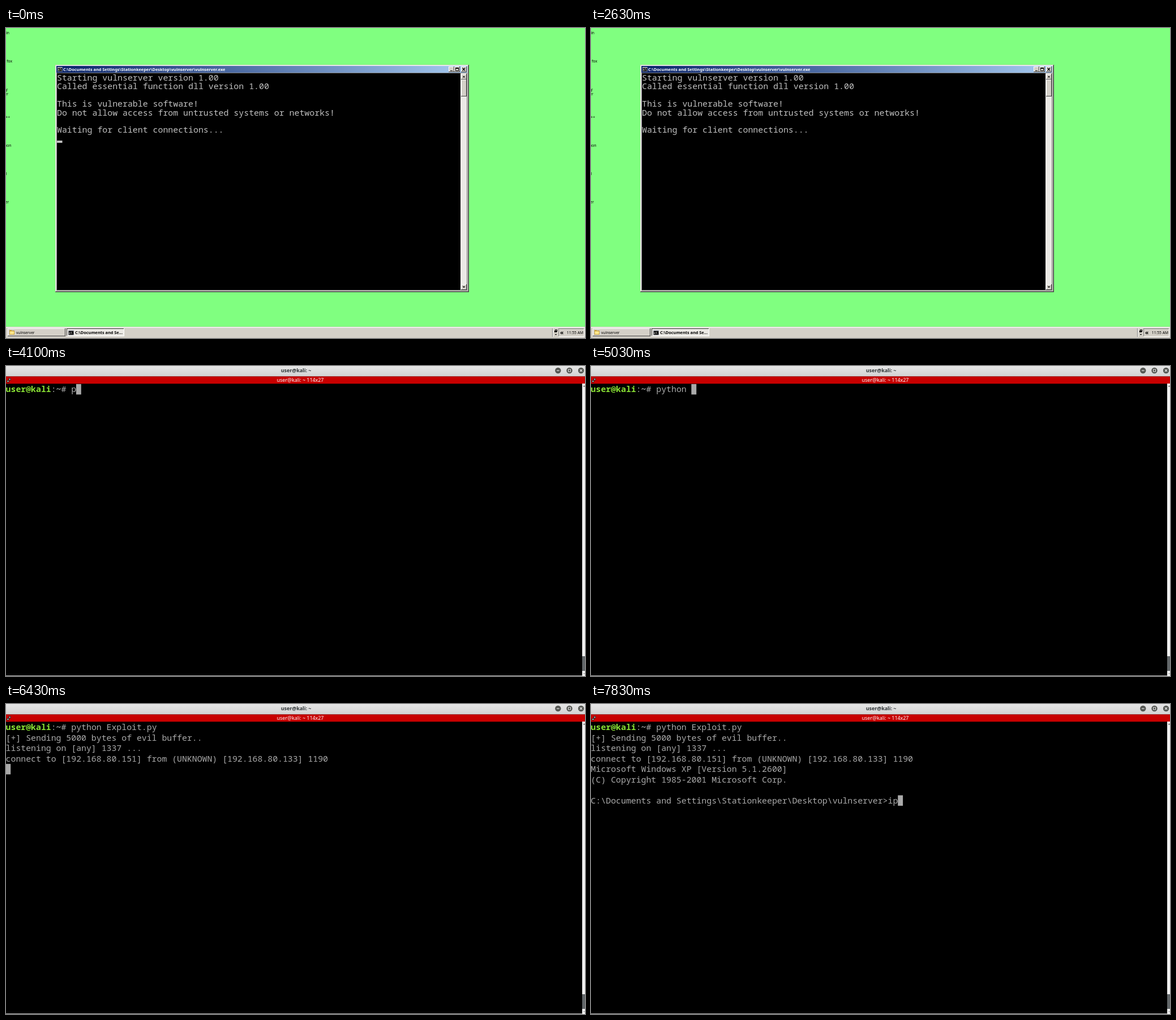
An HTML page with a canvas that plays this animation: 1023x548 px, repeating every 8000 ms.

```html
<!DOCTYPE html>
<html lang="en">
<head>
<meta charset="utf-8">
<title>Terminal session</title>
<style>
html, body { margin: 0; width: 100%; height: 100%; overflow: hidden; background: #000; }
canvas { display: block; width: 1023px; height: 548px; }
</style>
</head>
<body>
<canvas id="stage" width="1023" height="548"></canvas>
<script>
const ctx = document.getElementById('stage').getContext('2d');
const LOOP = 8000;
const SANS = '"Noto Sans", "Open Sans", sans-serif';
const MONO = '"Noto Sans Mono", "DejaVu Sans Mono", monospace';
const FACE = '#d4d0c8', DARK = '#404040', SHADE = '#808080', GREY = '#aaaaaa';
const PATH = 'C:\\Documents and Settings\\Stationkeeper\\Desktop\\vulnserver';
const HOST = 'user@kali';

function box(x, y, w, h, color) {
  ctx.fillStyle = color;
  ctx.fillRect(x, y, w, h);
}

function text(str, x, y, font, color, align = 'left') {
  ctx.font = font;
  ctx.fillStyle = color;
  ctx.textAlign = align;
  ctx.fillText(str, x, y);
}

function poly(points, color) {
  ctx.fillStyle = color;
  ctx.beginPath();
  points.forEach(([x, y]) => ctx.lineTo(x, y));
  ctx.fill();
}

function frame(x, y, w, h, color) {
  ctx.strokeStyle = color;
  ctx.lineWidth = 1;
  ctx.strokeRect(x + 0.5, y + 0.5, w - 1, h - 1);
}

function bevel(x, y, w, h, face, light, dark) {
  box(x, y, w, h, face);
  box(x, y, w, 1, light);
  box(x, y, 1, h, light);
  box(x, y + h - 1, w, 1, dark);
  box(x + w - 1, y, 1, h, dark);
}

const raised = (x, y, w, h) => bevel(x, y, w, h, FACE, '#fff', DARK);

function arrow(x, y, dir, size = 2.5, color = '#000') {
  poly([[x - size, y - dir * size / 2], [x + size, y - dir * size / 2], [x, y + dir * size / 2]], color);
}

function shellIcon(x, y, w, h) {
  box(x, y, w, h, '#c8ccd4');
  box(x + 0.6, y + 1.5, w - 1.2, h - 2.1, '#000');
  text('c:\\', x + 1.3, y + h - 2, `bold 4.5px ${SANS}`, '#fff');
}

/* Desktop with the server console */

const LABELS = [
  ['in', 6, 9], ['fox', 11, 59], ['y', 3, 109], ['er', 4, 117],
  ['++', 7, 158], ['hon', 9.5, 208], ['l', 1.5, 258], ['er', 5, 308]
];

const SERVER_LOG = [
  'Starting vulnserver version 1.00',
  'Called essential function dll version 1.00',
  '',
  'This is vulnerable software!',
  'Do not allow access from untrusted systems or networks!',
  '',
  'Waiting for client connections...'
];

const BLINKS = [520, 990, 1550, 2080, 2630];
const passed = (times, t) => times.filter(at => t >= at).length;

function titleButtons() {
  [782, 792, 804].forEach(x => raised(x, 68, 10, 10));
  box(785, 75, 4, 1, '#000');
  frame(794, 70, 6, 6, '#000');
  box(794, 70, 6, 2, '#000');
  ctx.strokeStyle = '#000';
  ctx.lineWidth = 1.2;
  ctx.beginPath();
  ctx.moveTo(806.5, 70.5);
  ctx.lineTo(811, 75.5);
  ctx.moveTo(811, 70.5);
  ctx.lineTo(806.5, 75.5);
  ctx.stroke();
}

function consoleWindow(t) {
  bevel(87, 65, 731, 402, FACE, FACE, DARK);
  bevel(88, 66, 729, 400, FACE, '#fff', SHADE);
  const grad = ctx.createLinearGradient(89, 0, 815, 0);
  grad.addColorStop(0, '#0a246a');
  grad.addColorStop(1, '#a6caf0');
  box(89, 67, 726, 12, grad);
  shellIcon(91, 69, 8.5, 8);
  text(PATH + '\\vulnserver.exe', 101, 75.7, `bold 7.35px ${SANS}`, '#fff');
  titleButtons();

  box(89, 79, 726, 385, SHADE);
  box(90, 80, 713, 383, '#000');
  box(803, 80, 11, 383, '#ebe9e5');
  raised(804, 81, 10, 10);
  raised(804, 91, 10, 30);
  raised(804, 453, 10, 10);
  arrow(809, 86, -1);
  arrow(809, 458, 1);

  SERVER_LOG.forEach((line, i) => text(line, 90, 93 + i * 15.4, `14.88px ${MONO}`, '#c0c0c0'));
  if (passed(BLINKS, t) % 2 === 0) box(90, 199, 9.5, 4, '#c0c0c0');
}

function taskbar() {
  box(0, 528, 1023, 20, FACE);
  box(0, 529, 1023, 1, '#fff');

  raised(3, 531, 102, 14);
  box(6, 534, 4, 2, '#d8b040');
  box(6, 535, 9, 7, '#b08820');
  box(6.7, 536, 7.6, 5.3, '#ffe88c');
  text('vulnserver', 18, 540.5, `6.6px ${SANS}`, '#000');

  bevel(107, 531, 102, 14, '#ebe9e4', DARK, '#fff');
  shellIcon(110, 534, 10, 9);
  text('C:\\Documents and Se...', 122, 541, `bold 7.35px ${SANS}`, '#000');

  box(965, 531, 1, 15, SHADE);
  box(966, 531, 1, 15, '#fff');
  frame(970, 533, 4, 4, '#000');
  frame(969, 535, 4, 3, '#000');
  arrow(971.5, 542, 1, 1.8);
  bevel(976, 531, 46, 15, FACE, SHADE, '#fff');
  text('«', 979, 541.5, `bold 10px ${SANS}`, '#000');
  text('11:55 AM', 1020, 541, `6.7px ${SANS}`, '#000', 'right');
}

function desktop(t) {
  box(0, 0, 1023, 548, '#80ff80');
  LABELS.forEach(([str, right, mid]) => text(str, right, mid + 2.4, `6.7px ${SANS}`, '#000', 'right'));
  consoleWindow(t);
  taskbar();
}

/* Full-screen terminal */

const CELL = 8.9, ROW = 18.5, LEFT = -0.4, TOP = 31.9;
const TERM = `14.83px ${MONO}`;
const COMMAND = 'python Exploit.py ';
const KEYS = [4100, 4250, 4420, 4570, 4730, 4880, 5030, 5200, 5430];
const COMPLETE = 5660;
const REPLY_KEYS = [7680, 7830];
const OUTPUT = [
  [5970, '[+] Sending 5000 bytes of evil buffer..'],
  [5970, 'listening on [any] 1337 ...'],
  [6430, 'connect to [192.168.80.151] from (UNKNOWN) [192.168.80.133] 1190'],
  [6510, 'Microsoft Windows XP [Version 5.1.2600]'],
  [6580, '(C) Copyright 1985-2001 Microsoft Corp.'],
  [6580, '']
];
const PROMPT_AT = 6580, CURSOR_OFF = 7130;

function put(str, col, row, color = GREY, weight = '') {
  text(str, LEFT + col * CELL, TOP + row * ROW + 14.4, `${weight} ${TERM}`, color);
}

function cursor(col, row) {
  box(LEFT + col * CELL - 0.3, TOP + row * ROW, CELL, ROW, GREY);
}

function windowButton(x) {
  ctx.fillStyle = '#555753';
  ctx.beginPath();
  ctx.arc(x, 8, 5.2, 0, 7);
  ctx.fill();
}

function chrome() {
  const grad = ctx.createLinearGradient(0, 0, 0, 18);
  grad.addColorStop(0, '#e6e6e6');
  grad.addColorStop(1, '#d3d3d3');
  box(0, 0, 1023, 18.5, grad);
  text(HOST + ': ~', 512.5, 11.2, `bold 8.9px ${SANS}`, '#2e3436', 'center');

  [975.3, 995.5, 1016].forEach(windowButton);
  box(973, 7.5, 4.6, 1.2, '#e4e4e4');
  frame(993, 5.5, 5, 5, '#e4e4e4');
  ctx.strokeStyle = '#e4e4e4';
  ctx.lineWidth = 1.1;
  ctx.beginPath();
  ctx.moveTo(1014, 6);
  ctx.lineTo(1018, 10);
  ctx.moveTo(1018, 6);
  ctx.lineTo(1014, 10);
  ctx.stroke();

  box(0, 18.5, 1023, 12.8, '#c80000');
  text(HOST + ': ~ 114x27', 520, 28.2, `8.9px ${SANS}`, '#fff', 'center');
  box(4.5, 21.5, 4, 4, '#222');
  box(1.5, 25, 4, 4, '#222');
  box(5.5, 22.5, 2, 2, '#ccc');
  box(2.5, 26, 2, 2, '#ccc');

  box(1018, 31, 5, 517, '#f0f0f0');
  box(1018, 513, 5, 26, '#62676a');
  arrow(1021.5, 35.5, -1, 2, '#555');
  arrow(1021.5, 544, 1, 2, '#aaa');
  box(0, 547, 1018, 1, '#b8b8b8');
}

function terminal(t) {
  box(0, 0, 1023, 548, '#000');
  chrome();

  put(HOST, 0, 0, '#8ae234', 'bold');
  put(':', 9, 0);
  put('~', 10, 0, GREY, 'bold');
  put('#', 11, 0);
  const typed = t >= COMPLETE ? COMMAND.length : passed(KEYS, t);
  put(COMMAND.slice(0, typed), 13, 0);

  const lines = OUTPUT.filter(([at]) => t >= at);
  lines.forEach(([, line], i) => put(line, 0, i + 1));

  if (t >= PROMPT_AT) {
    const count = passed(REPLY_KEYS, t);
    const prompt = PATH + '>' + 'ip'.slice(0, count);
    put(prompt, 0, 7);
    if (t < CURSOR_OFF || count) cursor(prompt.length, 7);
  } else if (lines.length) {
    cursor(0, lines.length + 1);
  } else {
    cursor(13 + typed, 0);
  }
}

function draw() {
  const t = performance.now() % LOOP;
  if (t < 2860) desktop(t);
  else terminal(t);
  requestAnimationFrame(draw);
}
draw();
</script>
</body>
</html>
```
